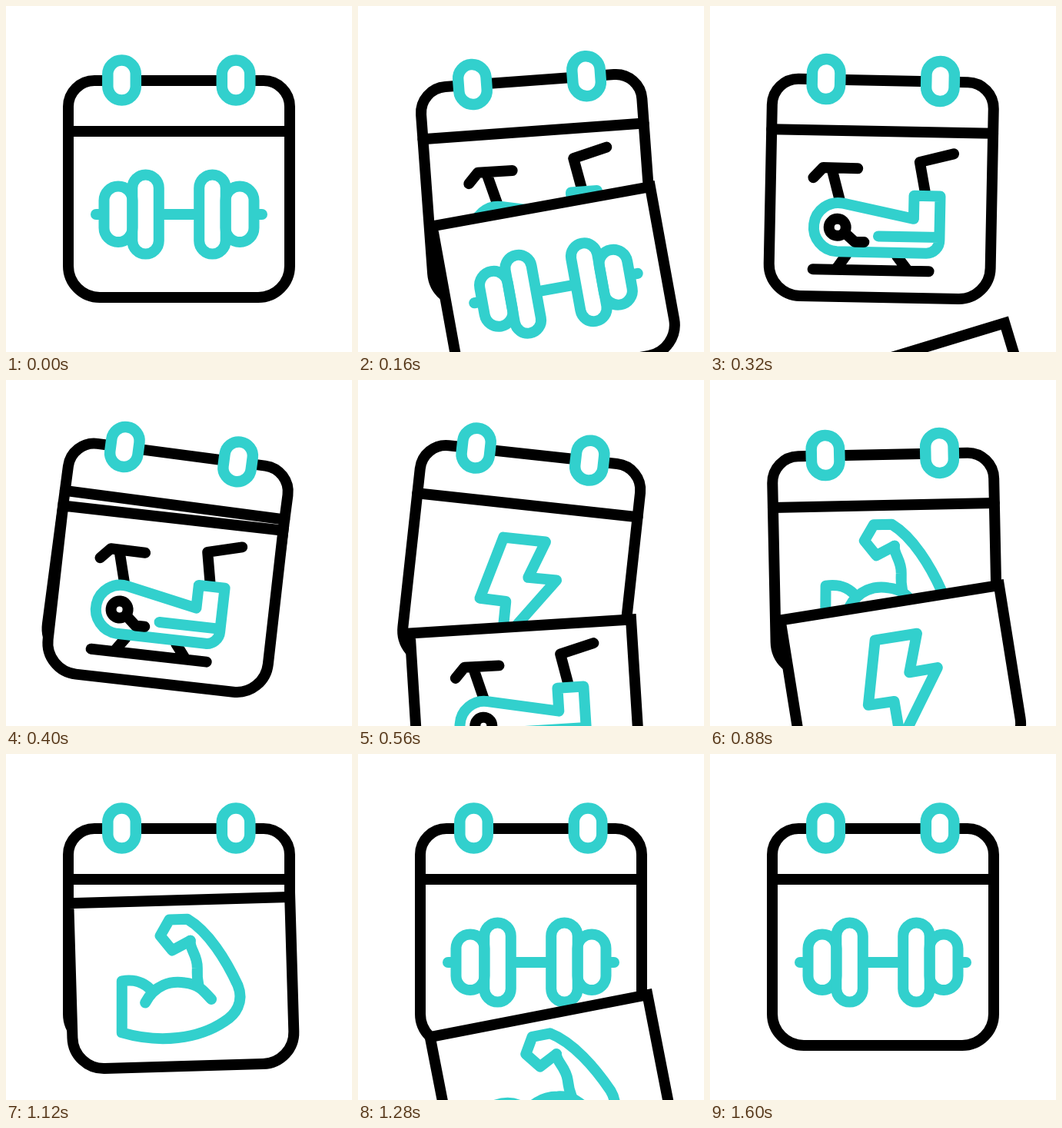
Write an HTML page that moves like this. It is 450 px wide and 450 px high and loops after 1680 ms.

```html
<!DOCTYPE html>
<html lang="en">
<head>
<meta charset="utf-8">
<title>Workout calendar</title>
<style>
  html, body { margin: 0; width: 100%; height: 100%; overflow: hidden; background: #fff; }
  svg { display: block; width: 100%; height: 100%; }
  .ink, .teal { fill: none; stroke-width: 14; stroke-linecap: round; stroke-linejoin: round; }
  .ink { stroke: #000; }
  .teal { stroke: #32d0cd; }
  .sheet { fill: #fff; stroke-linejoin: miter; }
  .ring { fill: #fff; stroke-width: 14.5; }
</style>
</head>
<body>
<svg viewBox="0 0 450 450">
  <defs>
    <g id="icon0" class="teal">
      <path d="M206 271H244M117 271H127M323 271H333"/>
      <rect x="127.5" y="234.5" width="37" height="72.5" rx="18.5"/>
      <rect x="285.5" y="234.5" width="37" height="72.5" rx="18.5"/>
      <rect x="164.3" y="219.5" width="34.5" height="103" rx="17.2"/>
      <rect x="251.2" y="219.5" width="34.5" height="103" rx="17.2"/>
    </g>
    <g id="icon1">
      <path class="ink" d="M136.5 225L149 211.5L194 212M160 212L171 252M318.5 190.5L274.5 202L282 240
        M181 325L168 344M247 325L262 344M138 344H289"/>
      <path class="teal" d="M176 257.7L268 276V246H302V303A17 17 0 0 1 285 320.5H169A31.7 31.7 0 1 1 176 257.7M222.5 299.5H302"/>
      <circle class="ink" cx="169" cy="289" r="11"/>
      <path class="ink" d="M180 297L192 307.5H204"/>
    </g>
    <path id="icon2" class="teal" d="M198.5 208H253.5L236 256.5L273 256L211 343.5L210.5 290.5L176.5 290Z"/>
    <g id="icon3" class="teal">
      <path d="M238 216L214 228L199 208.5L211.5 188H235C262 205 284 243 298 276C306 298 294 314 279 322.5
        C245 344 195 349 145.5 333L147.5 266C163 264 176 267 187 281"/>
      <path d="M177 295C190 272 211 267 229 270.5C247 273 253 281 263 293"/>
      <path d="M238 216C236 226 247 235 246 252Q245 264 247 275"/>
    </g>
  </defs>
  <g id="calendar">
    <path class="ink sheet" d="M115 97H335A34 34 0 0 1 369 131V338A41 41 0 0 1 328 379H122A41 41 0 0 1 81 338V131A34 34 0 0 1 115 97Z"/>
    <path class="ink" d="M81 163H369"/>
    <use id="next"/>
    <g id="page">
      <path class="ink sheet" d="M81 163H369V338A41 41 0 0 1 328 379H122A41 41 0 0 1 81 338Z"/>
      <use id="torn"/>
    </g>
    <rect class="teal ring" x="132.3" y="70.5" width="36.5" height="52" rx="18.2"/>
    <rect class="teal ring" x="280.8" y="70.5" width="36.5" height="52" rx="18.2"/>
  </g>
</svg>
<script>
const LOOP = 1680, STEP = 80, FALL = 400;
const starts = [9, 353, 701, 1056];
const swing = [[0, 0], [200, -4.6], [485, 10.6], [700, -5.6], [960, 0], [LOOP, 0]];
const [calendar, next, page, torn] =
  ["calendar", "next", "page", "torn"].map(id => document.getElementById(id));

function tilt(t) {
  const i = swing.findIndex(([time]) => time > t);
  const [t0, a] = swing[i - 1], [t1, b] = swing[i];
  return a + (b - a) * (0.5 - 0.5 * Math.cos(Math.PI * (t - t0) / (t1 - t0)));
}

function draw(t) {
  const count = starts.filter(s => s <= t).length;
  const age = count ? t - starts[count - 1] : Infinity;
  const falling = age < FALL;
  calendar.setAttribute("transform", `rotate(${tilt(t)} 225 121)`);
  next.setAttribute("href", "#icon" + count % starts.length);
  page.setAttribute("visibility", falling ? "visible" : "hidden");
  if (falling) {
    const drop = 0.053 * age ** 1.5;
    torn.setAttribute("href", "#icon" + (count - 1));
    page.setAttribute("transform",
      `translate(${0.00032 * drop * drop} ${drop}) rotate(${-0.062 * drop} 225 163)`);
  }
}

const origin = performance.now();
function tick() {
  const t = (performance.now() - origin) % LOOP;
  draw(Math.floor(t / STEP) * STEP);
  requestAnimationFrame(tick);
}
tick();
</script>
</body>
</html>
```
